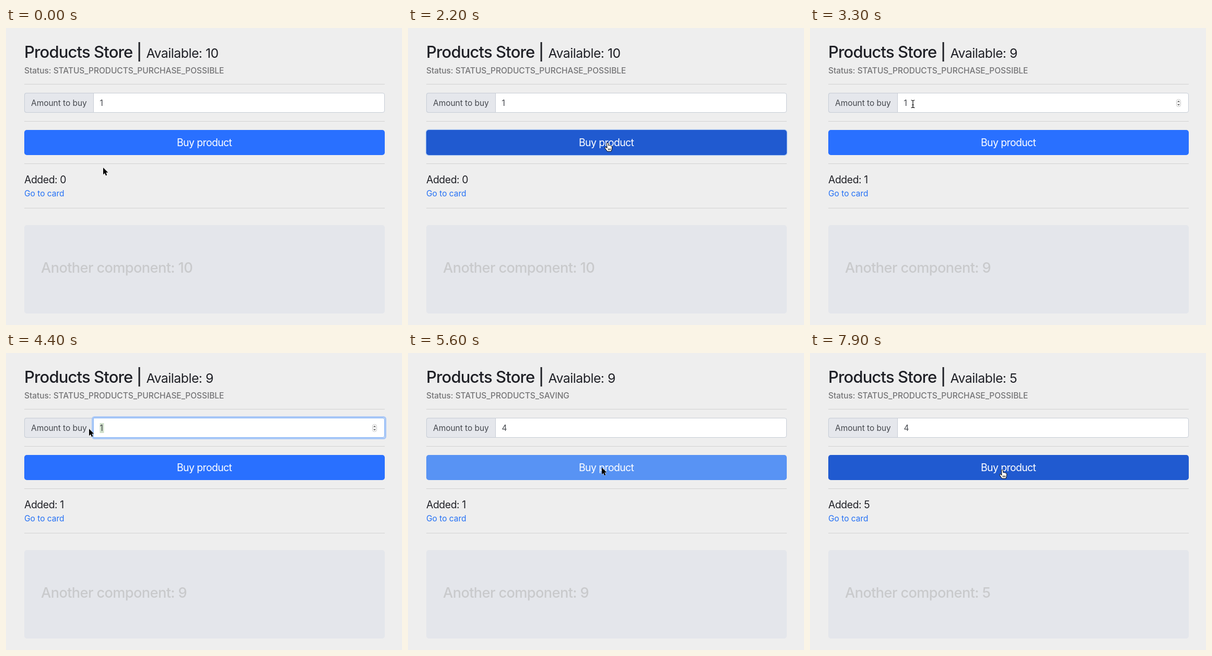
An HTML page for the animation above (8000 ms loop, 758x568 px).

```html
<!DOCTYPE html>
<html lang="en">
<head>
<meta charset="utf-8">
<title>Products Store</title>
<style>
  html, body { margin: 0; width: 100%; height: 100%; overflow: hidden; background: #eee; }
  svg { display: block; width: 758px; height: 568px; }
  text { font: 400 15.5px Inter, "Open Sans", sans-serif; fill: #1f2026; white-space: pre; }
  .title { font-size: 31px; font-weight: 500; letter-spacing: -.87px; }
  .stock { font-size: 24.8px; letter-spacing: -.5px; }
  .status { font-weight: 500; fill: #747476; letter-spacing: -.04px; }
  .field { fill: #45484e; letter-spacing: -.04px; }
  .buy { font-size: 19.4px; letter-spacing: -.58px; fill: #fff; text-anchor: middle; }
  .added { font-size: 19.4px; letter-spacing: -.44px; }
  .link { fill: #2470f5; }
  .other { font-size: 27.2px; font-weight: 500; letter-spacing: -.62px; fill: #c9cacc; }
  .rule { stroke: #d2d2d2; }
  .arrow { fill: #000; stroke: #fff; stroke-width: 1; paint-order: stroke; }
  .hand { fill: #fff; stroke: #000; stroke-width: 1; stroke-linejoin: round; }
  .beam { fill: none; stroke: #111; stroke-width: 1.2; }
</style>
</head>
<body>
<svg viewBox="0 0 758 568">
  <rect width="758" height="568" fill="#eee"/>
  <text class="title" x="35" y="57">Products Store |</text>
  <text class="stock" id="stock" x="268.6" y="57"></text>
  <text class="status" id="status" x="35" y="87"></text>
  <path class="rule" d="M35 107.5H725M35 178.5H725M35 259.5H725M35 344.5H725"/>

  <rect x="35.5" y="124.5" width="689" height="37" rx="3.5" fill="#fff" stroke="#c6ccd5"/>
  <path d="M167.5 124.5V161.5H39Q35.5 161.5 35.5 158V128Q35.5 124.5 39 124.5Z" fill="#e5e7ec" stroke="#c6ccd5"/>
  <text class="field" x="48" y="149">Amount to buy</text>
  <g id="focus">
    <rect x="165.5" y="122.5" width="561" height="41" rx="4" fill="none" stroke="#aac8f6" stroke-width="3"/>
    <path d="M167.5 124.5H721Q724.5 124.5 724.5 128V158Q724.5 161.5 721 161.5H167.5Z" fill="#fff" stroke="#88b6f8"/>
  </g>
  <rect id="mark" x="179.5" y="134" width="8" height="19" fill="#cfdfca"/>
  <text class="field" id="amount" x="179.5" y="149"></text>
  <g id="spinner" fill="none">
    <rect x="701.5" y="136.5" width="8" height="14" rx="4" fill="#fff" stroke="#c4c4c4"/>
    <path d="M703.7 141.8L705.5 139.8 707.3 141.8M703.7 145.4L705.5 147.4 707.3 145.4" stroke="#444" stroke-width="1.2"/>
  </g>

  <rect id="ring" fill="#4b93fa"/>
  <rect id="button" x="35" y="195" width="690" height="48" rx="4.8"/>
  <text class="buy" x="379.7" y="226">Buy product</text>

  <text class="added" id="added" x="35" y="297"></text>
  <text class="link" x="35" y="322">Go to card</text>
  <rect x="35" y="377" width="690" height="169" rx="4.8" fill="#e4e6eb"/>
  <text class="other" id="other" x="67" y="468"></text>

  <g id="cursor">
    <path class="arrow" d="M0 0V13.2L3 10.4 5 15.2 7.3 14.2 5.3 9.6H9.4Z"/>
    <g class="hand">
      <path d="M-1.6 1.2Q0-.6 1.4 1.2L1.8 5.5Q3.2 4.6 4.3 6Q5.8 5.2 6.6 6.8Q8.6 6.4 8.7 8.6L8.2 12.5 7 17H-.4Q-3.5 13-5 10.5Q-5.6 8.4-3.8 8.6L-1 10.6Z"/>
      <path d="M1.4 11.5V14.5M3.4 11.5V14.5M5.4 11.5V14.5"/>
    </g>
    <path class="beam" d="M-3.5-7Q0-7 0-5Q0-7 3.5-7M0-6V6.5M-3.5 7.5Q0 7.5 0 5.5Q0 7.5 3.5 7.5M-2 2H2"/>
  </g>
</svg>
<script>
  const LOOP = 8000, STEP = 100;
  const el = id => document.getElementById(id);
  const shapes = [...el('cursor').children];

  const BASE = '#2970ff', HOVER = '#205ad0', OFF = '#5893f4';
  const READY = 'PURCHASE_POSSIBLE', SAVING = 'SAVING';
  const ARROW = 0, HAND = 1, BEAM = 2;

  // Step tables: [start time, value]
  const steps = {
    stock: [[0, 10], [3200, 9], [6500, 5]],
    status: [[0, READY], [2300, SAVING], [3200, READY], [5600, SAVING], [6500, READY]],
    amount: [[0, 1], [4800, 4]],
    button: [[0, BASE], [1500, '#2463e4'], [1600, HOVER], [2300, OFF], [3200, BASE],
             [5000, '#2463e4'], [5100, HOVER], [5600, OFF], [6500, BASE], [6600, '#235ddb'], [6700, HOVER]],
    ring: [[0, 0], [2200, .4], [2300, 0], [5500, .6], [5600, 0]],
    focus: [[0, 0], [3900, .5], [4000, 1], [5400, .5], [5500, 0]],
    mark: [[0, 0], [4100, 1], [4800, 0]],
    spinner: [[0, 0], [1000, 1], [1400, 0], [3100, 1], [5400, 0]],
    shape: [[0, ARROW], [1000, BEAM], [1400, ARROW], [1500, HAND], [2300, ARROW], [3100, BEAM],
            [4300, ARROW], [5000, HAND], [5600, ARROW], [6600, HAND]]
  };

  // Pointer stops: [time, x, y]
  const path = [
    [0, 186, 267], [500, 186, 267], [800, 360, 248], [900, 418, 178], [1100, 420, 149],
    [1300, 412, 151], [1500, 392, 205], [1800, 382, 219], [2700, 382, 219], [3100, 215, 150],
    [3300, 197, 145], [4000, 197, 145], [4400, 159, 145], [4700, 159, 145], [5000, 330, 205],
    [5300, 371, 219], [6400, 371, 219], [6600, 370, 215], [7200, 370, 216], [7700, 368, 223], [8000, 368, 223]
  ];

  const at = (name, t) => steps[name].findLast(s => s[0] <= t)[1];

  function pointer(t) {
    const i = path.findLastIndex(p => p[0] <= t);
    const [t0, x0, y0] = path[i], [t1, x1, y1] = path[i + 1];
    const k = (t - t0) / (t1 - t0), e = k * k * (3 - 2 * k);
    return [x0 + (x1 - x0) * e, y0 + (y1 - y0) * e];
  }

  function setRing(k) {
    const d = 3.2 * k;
    const box = { x: 35 - d, y: 195 - d, width: 690 + 2 * d, height: 48 + 2 * d, rx: 4.8 + d, opacity: k };
    for (const key in box) el('ring').setAttribute(key, box[key]);
  }

  function draw(t) {
    const stock = at('stock', t), shape = at('shape', t);
    el('stock').textContent = 'Available: ' + stock;
    el('added').textContent = 'Added: ' + (10 - stock);
    el('other').textContent = 'Another component: ' + stock;
    el('status').textContent = 'Status: STATUS_PRODUCTS_' + at('status', t);
    el('amount').textContent = at('amount', t);
    el('button').style.fill = at('button', t);
    for (const id of ['focus', 'mark', 'spinner']) el(id).style.opacity = at(id, t);
    setRing(at('ring', t));
    shapes.forEach((s, i) => s.style.display = i === shape ? '' : 'none');
    el('cursor').setAttribute('transform', `translate(${pointer(t)})`);
  }

  const start = performance.now();
  let shown = -1;
  function tick() {
    const t = Math.floor((performance.now() - start) % LOOP / STEP) * STEP;
    if (t !== shown) draw(shown = t);
    requestAnimationFrame(tick);
  }
  tick();
</script>
</body>
</html>
```
